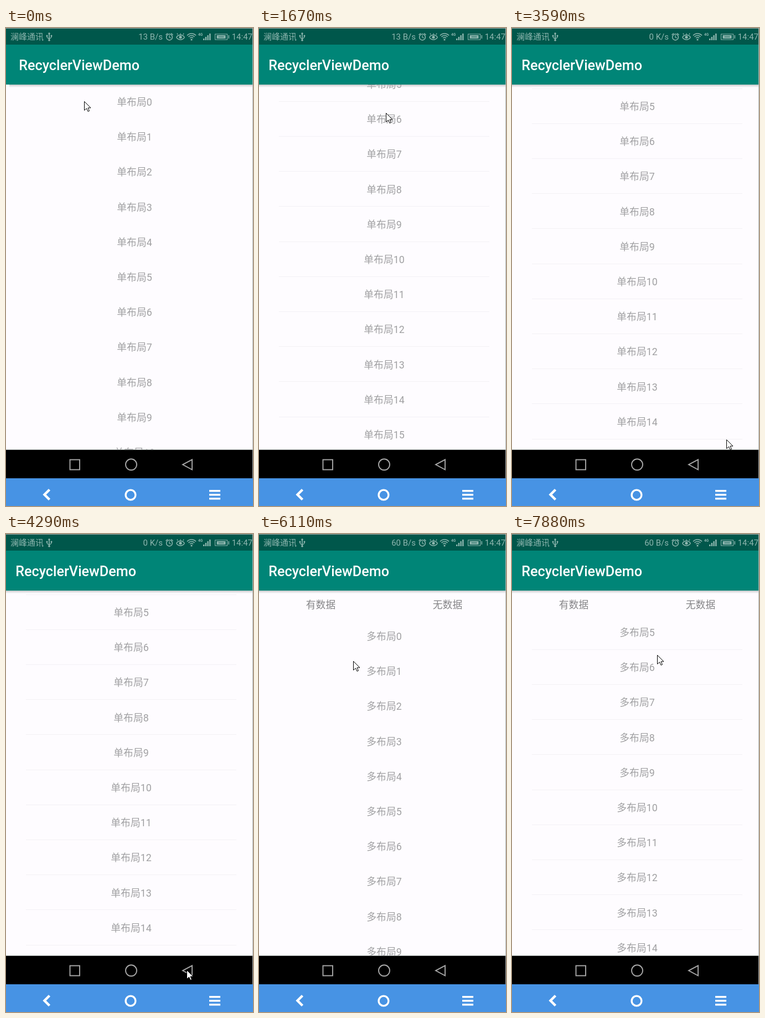
These frames come from a looping animation (446x862 px, 8000 ms). An HTML page with a canvas:

```html
<!DOCTYPE html>
<html lang="zh-CN">
<head>
<meta charset="utf-8">
<title>RecyclerViewDemo</title>
<style>
html, body { margin: 0; width: 100%; height: 100%; overflow: hidden; background: #fff; }
canvas { display: block; width: 446px; height: 862px; }
</style>
</head>
<body>
<canvas id="stage" width="446" height="862"></canvas>
<script>
const ctx = document.getElementById('stage').getContext('2d');
const W = 446, H = 862, MID = 226, LOOP = 8000, TICK = 135;
const FONT = 'Roboto, "Noto Sans CJK SC", "Noto Sans CJK", sans-serif';
const ROW = 63.2, BAR_TOP = 30, BAR_END = 102, LIST_END = 761;
const PAPER = '#fefcff', TEAL = '#008577', DARK = '#00574b';
const ICON = '#8fb6af', RULE = '#f3f1f5', GREY = '#a0a0a2';
const MENU_OPENS = 4570, MULTI_OPENS = 5860;

// The hand: free moves, and drags that take the list along
const moves = [];
const move = (from, to, x, y, drag = false) => moves.push({ from, to, x, y, drag });
const drag = (from, to, x, y) => move(from, to, x, y, true);

move(580, 860, 238, 397);
drag(860, 1540, 240, 49);
move(1540, 1670, 229, 153);
move(1670, 2080, 244, 535);
drag(2080, 2780, 246, 278);
drag(2780, 3170, 250, 575);
move(3470, 3590, 387, 742);
move(3590, 4290, 326, 786);
move(MENU_OPENS, 5190, 177, 292);
move(5190, 5450, 168, 222);
move(MULTI_OPENS, 6950, 221, 382);
drag(6950, 7350, 235, 170);
move(7350, 7600, 255, 329);
drag(7600, 7880, 262, 218);

// Eased progress in whole screen updates
function progress(t, from, to) {
  const n = Math.max(1, Math.round((to - from) / TICK));
  const k = Math.floor(n * Math.min(1, (t - from) / (to - from)) + 0.01) / n;
  return k * k * (3 - 2 * k);
}

// Pointer place, and how far the list opened at `since` has been dragged
function pose(t, since) {
  let x = 141, y = 132, scroll = 0;
  for (const m of moves) {
    if (t < m.from) break;
    const k = progress(t, m.from, m.to), dy = (m.y - y) * k;
    x += (m.x - x) * k;
    y += dy;
    if (m.drag && m.from >= since) scroll -= dy;
  }
  return { x, y, scroll };
}

function rect(x, y, w, h, color) {
  ctx.fillStyle = color;
  ctx.fillRect(x, y, w, h);
}

function frame(x, y, w, h, color, width) {
  ctx.strokeStyle = color;
  ctx.lineWidth = width;
  ctx.strokeRect(x, y, w, h);
}

function text(str, x, y, size, color, align = 'left', weight = 400) {
  ctx.font = `${weight} ${size}px ${FONT}`;
  ctx.textAlign = align;
  ctx.fillStyle = color;
  ctx.fillText(str, x, y + size * 0.365);
}

function path(points, closed) {
  ctx.beginPath();
  for (let i = 0; i < points.length; i += 2) ctx.lineTo(points[i], points[i + 1]);
  if (closed) ctx.closePath();
}

function line(points, color, width, closed) {
  path(points, closed);
  ctx.strokeStyle = color;
  ctx.lineWidth = width;
  ctx.stroke();
}

// Arc centred on direction `dir`, spanning `spread` half-turns each way
function arc(x, y, r, color, width, dir = 0, spread = 1) {
  ctx.beginPath();
  ctx.arc(x, y, r, (dir - spread) * Math.PI, (dir + spread) * Math.PI);
  ctx.strokeStyle = color;
  ctx.lineWidth = width;
  ctx.stroke();
}

function dot(x, y, r, color) {
  ctx.beginPath();
  ctx.arc(x, y, r, 0, Math.PI * 2);
  ctx.fillStyle = color;
  ctx.fill();
}

function clipTo(top) {
  ctx.save();
  ctx.beginPath();
  ctx.rect(0, top, W, LIST_END - top);
  ctx.clip();
}

function usb(x, y) {
  line([x, y - 6, x, y + 6], ICON, 1.6);
  arc(x, y - 1, 4, ICON, 1.5, 0.5, 0.5);
  dot(x - 4, y - 2, 1.5, ICON);
  dot(x + 4, y - 2, 1.5, ICON);
  dot(x, y - 6, 1.7, ICON);
  dot(x, y + 6, 1.8, ICON);
}

function alarm(x, y) {
  arc(x, y, 5.4, ICON, 1.5);
  line([x, y - 3.5, x, y + 0.5, x + 3, y + 1.5], ICON, 1.2);
  for (const s of [-1, 1]) line([x + s * 6.5, y - 4, x + s * 3, y - 7], ICON, 1.6);
}

function eye(x, y) {
  arc(x, y + 4.5, 8.5, ICON, 1.5, -0.5, 0.33);
  arc(x, y - 4, 8.5, ICON, 1.5, 0.5, 0.33);
  dot(x, y, 2.6, ICON);
  for (const s of [-1, 0, 1]) line([x + s * 5, y - 4.5, x + s * 6, y - 7], ICON, 1.2);
}

function wifi(x, y) {
  for (let r = 4; r < 12; r += 3.5) arc(x, y, r, ICON, 1.5, -0.5, 0.26);
  dot(x, y, 1.6, ICON);
}

function battery(x, y) {
  frame(x, y - 5, 22, 10, ICON, 1);
  rect(x + 3, y - 3, 16, 6, ICON);
  rect(x + 24, y - 3, 1.5, 6, ICON);
  line([x + 6, y, x + 16, y], DARK, 1);
}

function statusBar(speed) {
  rect(0, 0, W, BAR_TOP, DARK);
  rect(0, 0, W, 1, '#a3a9a8');
  text('澜峰通讯', 8, 16, 15, ICON);
  usb(78, 16);
  text(speed, 283, 16, 15, ICON, 'right');
  alarm(295, 16.5);
  eye(315, 16.5);
  wifi(335, 21);
  text('4G', 347, 12, 6.5, ICON, 'left', 700);
  for (let i = 0; i < 4; i++) rect(356 + i * 3.7, 19 - i * 3, 2.4, 3 + i * 3, ICON);
  battery(377.5, 16);
  text('14:47', 445, 16, 15, ICON, 'right');
}

function actionBar() {
  rect(0, BAR_TOP, W, BAR_END - BAR_TOP, TEAL);
  const g = ctx.createLinearGradient(0, BAR_END, 0, BAR_END + 5);
  g.addColorStop(0, 'rgba(150,155,155,.6)');
  g.addColorStop(1, 'rgba(205,205,208,.1)');
  rect(0, BAR_END, W, 5, g);
  text('RecyclerViewDemo', 17.3, 67, 25.2, '#fff', 'left', 500);
}

function rows(name, top, scroll) {
  clipTo(top);
  for (let i = 0; i < 20; i++) {
    const y = top + ROW * (i + 0.5) - scroll;
    text(name + i, MID, y, 17.8, GREY, 'center');
    if (scroll > 0) rect(36, Math.floor(y + ROW / 2 - 1), 380, 1, RULE);
  }
  ctx.restore();
}

function singlePage(scroll) {
  rect(0, BAR_END, W, LIST_END - BAR_END, PAPER);
  rows('单布局', BAR_END, scroll);
  actionBar();
}

function multiPage(scroll) {
  rect(0, BAR_END, W, LIST_END - BAR_END, PAPER);
  rows('多布局', 153, scroll);
  text('有数据', MID - 114.5, 128, 17.8, '#858587', 'center');
  text('无数据', MID + 114.5, 128, 17.8, '#858587', 'center');
  actionBar();
}

function menuPage() {
  rect(0, BAR_END, W, LIST_END - BAR_END, '#f9fafc');
  rect(81, BAR_END, 299, 317, PAPER);
  rect(81, 419, 299, LIST_END - 419, '#f4f4f5');
  ['单布局使用', '多布局使用', '悬浮标题', '常见复杂界面'].forEach((label, i) => {
    const y = 141.7 + i * 79.4;
    text(label, 22.5, y, 20.2, '#8a8a8c');
    line([421.5, y - 7.5, 429, y - 0.5, 421.5, y + 6.5], '#b4b4b6', 1.4);
    if (i < 3) rect(81, Math.round(y + 38.5), 299, 1, RULE);
  });
  actionBar();
}

function slide(page, dx, scroll) {
  clipTo(BAR_TOP);
  ctx.translate(dx, 0);
  page(scroll);
  ctx.restore();
}

function navBars() {
  const grey = '#a8a8a8';
  rect(0, LIST_END - 1, W, 1, '#98a09d');
  rect(0, LIST_END, W, 51, '#000');
  frame(115.5, 778.5, 17.5, 18, grey, 1.9);
  arc(MID, 787.3, 10, grey, 1.9);
  line([319, 787.3, 336, 778.3, 336, 796.5], grey, 1.9, true);
  rect(445, 0, 1, 812, '#b0b5b5');
  rect(0, 812, W, 50, '#4793e4');
  line([78.5, 832.5, 69.5, 841.5, 78.5, 850.5], '#fff', 4.4);
  arc(225, 842, 8.9, '#fff', 3.4);
  for (let i = 0; i < 3; i++) rect(367, 833 + i * 7, 20, 3.5, '#fff');
}

function pointer({ x, y }) {
  ctx.save();
  ctx.translate(Math.round(x) + 0.5, Math.round(y) + 0.5);
  path([0, 0, 0, 16, 4, 12.5, 6.5, 18, 9, 17, 6.5, 11.5, 11.5, 11.5], true);
  ctx.fillStyle = '#fff';
  ctx.fill();
  ctx.strokeStyle = '#000';
  ctx.lineWidth = 1;
  ctx.stroke();
  ctx.restore();
}

function draw(t) {
  const hand = pose(t, t < MULTI_OPENS ? 0 : MULTI_OPENS);
  rect(0, 0, W, H, PAPER);
  if (t < MENU_OPENS) {
    rect(0, BAR_TOP, W, BAR_END - BAR_TOP, TEAL);
    slide(singlePage, t < 150 ? 6 : 0, hand.scroll);
  } else {
    menuPage();
    const out = Math.floor((t - MENU_OPENS) / TICK);
    if (out < 2) slide(singlePage, 81 + 299 * out, hand.scroll);
    if (t >= MULTI_OPENS) slide(multiPage, t < MULTI_OPENS + TICK ? 150 : 0, hand.scroll);
  }
  statusBar(t < 2080 ? '13 B/s' : t < 5300 ? '0 K/s' : '60 B/s');
  navBars();
  pointer(hand);
}

const start = performance.now();
function tick() {
  draw((performance.now() - start) % LOOP);
  requestAnimationFrame(tick);
}
tick();
</script>
</body>
</html>
```
